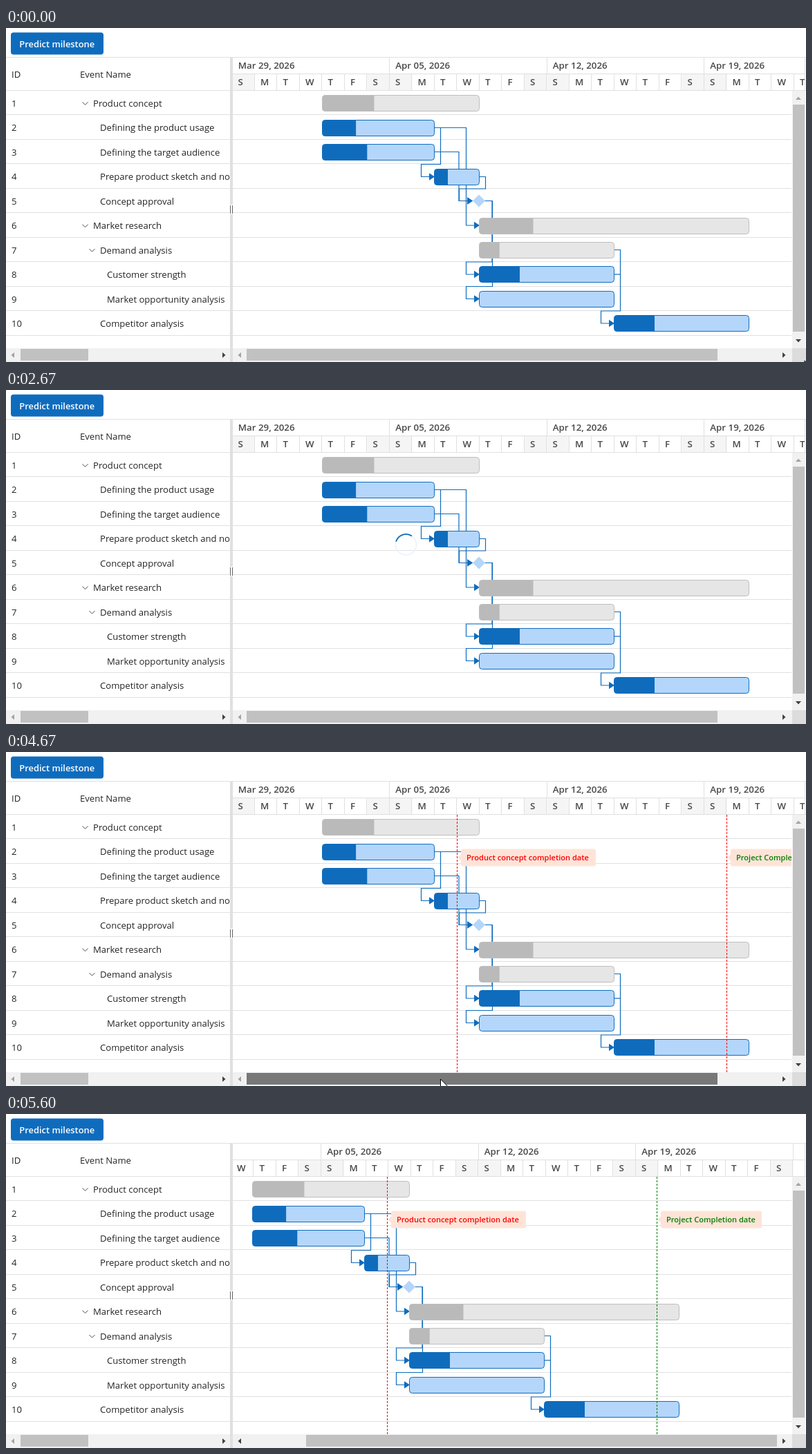
Recreate the animation shown at these times as an HTML page. Size 1157x484 px, loop 6.87 s.

```html
<!DOCTYPE html>
<html lang="en">
<head>
<meta charset="utf-8">
<title>Predict milestone</title>
<style>
  html, body { margin: 0; width: 100%; height: 100%; overflow: hidden; background: #fff; }
  svg { display: block; width: 1157px; height: 484px; }
  text { font-family: "Open Sans", "Noto Sans", sans-serif; font-size: 13.1px; fill: #242424; }
  .head text { font-weight: 600; font-size: 13.3px; fill: #484848; }
  .button { font-weight: 600; font-size: 12.9px; fill: #fff; }
  .label { font-weight: 600; font-size: 11.05px; }
  .rule { stroke: #e0e0e0; fill: none; }
  .link { stroke: #0f6cbd; stroke-width: 1.2; fill: none; }
  .dash { stroke-dasharray: 3 2; fill: none; }
</style>
</head>
<body>
<svg id="stage" viewBox="0 0 1157 484" xmlns="http://www.w3.org/2000/svg">
  <defs>
    <clipPath id="clipHead"><rect x="327" y="43" width="828" height="48"/></clipPath>
    <clipPath id="clipBody"><rect x="327" y="91" width="809" height="373"/></clipPath>
    <clipPath id="clipTree"><rect x="0" y="43" width="324" height="421"/></clipPath>
  </defs>
  <rect width="1157" height="484" fill="#fff"/>
  <rect id="button" x="7" y="6.5" width="134" height="32" rx="4"/>
  <text class="button" x="19.3" y="27.7">Predict milestone</text>
  <g id="tree" clip-path="url(#clipTree)">
    <text x="8" y="72">ID</text>
    <text x="107" y="72">Event Name</text>
  </g>
  <g clip-path="url(#clipHead)"><g id="head" class="head"></g></g>
  <g clip-path="url(#clipBody)">
    <g id="rules"></g>
    <g id="chart"><g id="links"></g><g id="bars"></g><g id="markers"></g></g>
  </g>
  <path class="rule" d="M0 42.5H1157M0 90.5H324M328 90.5H1157M328 66.5H1155M1155.5 43V90"/>
  <rect x="324" y="43" width="4" height="441" fill="#e0e0e0"/>
  <rect x="323" y="256" width="6" height="14" fill="#fff"/>
  <path d="M324.5 257V269M327.5 257V269" stroke="#616161"/>
  <g id="scrollbars"></g>
  <g id="spinner" fill="none" stroke-width="1.8">
    <circle cx="578.5" cy="224" r="15" stroke="#ebf3fc"/>
    <path id="arc" stroke="#0f6cbd"/>
  </g>
  <path id="arrow" fill="#fff" stroke="#000" d="M0 0V17.6L4.1 13.7L7 20.4L9.8 19.2L7 12.7H12.5Z"/>
  <path id="resize" fill="#000" stroke="#fff" stroke-width=".8"
        d="M-2.5 -10H-.8V10H-2.5ZM.8 -10H2.5V10H.8ZM-12.5 0L-7 -5V-1H-3.5V1H-7V5ZM12.5 0L7 -5V-1H3.5V1H7V5Z"/>
</svg>
<script>
  const LOOP = 6870, DAY = 32.5, LEFT = 327.5, ROW = 35.47;
  const BLUE = "#0f6cbd", PALE = "#b4d6fa";
  const $ = id => document.getElementById(id);
  const dayX = n => LEFT + n * DAY;
  const crisp = v => Math.ceil(v) - .5;

  function add(parent, tag, attrs, content) {
    const el = document.createElementNS("http://www.w3.org/2000/svg", tag);
    for (const key in attrs) el.setAttribute(key, attrs[key]);
    if (content) el.textContent = content;
    parent.appendChild(el);
    return el;
  }

  // name, indent level, start day, length in days, progress, has children
  const tasks = [
    ["Product concept", 0, 4, 7, .33, 1],
    ["Defining the product usage", 1, 4, 5, .3],
    ["Defining the target audience", 1, 4, 5, .4],
    ["Prepare product sketch and notes", 1, 9, 2, .3],
    ["Concept approval", 1, 11, 0, 0],
    ["Market research", 0, 11, 12, .2, 1],
    ["Demand analysis", 1, 11, 6, .15, 1],
    ["Customer strength", 2, 11, 6, .3],
    ["Market opportunity analysis", 2, 11, 6, 0],
    ["Competitor analysis", 1, 17, 6, .3]
  ];

  function drawBar(x, y, width, progress, parent) {
    const done = width * progress, bars = $("bars");
    const frame = { x, y, width, height: 23, rx: 4 };
    add(bars, "rect", { ...frame, fill: parent ? "#e6e6e6" : PALE });
    if (done) add(bars, "path", {
      d: `M${x + done} ${y}H${x + 4}q-4 0-4 4v15q0 4 4 4H${x + done}Z`,
      fill: parent ? "#bababa" : BLUE
    });
    add(bars, "rect", { ...frame, fill: "none", stroke: parent ? "#bebebe" : BLUE });
  }

  tasks.forEach(([name, level, start, days, progress, parent], i) => {
    const mid = 109 + ROW * i, line = Math.round(90 + ROW * (i + 1)) + .5;
    const textX = 126 + 10 * level;
    add($("tree"), "text", { x: 8, y: mid + 4.8 }, String(i + 1));
    add($("tree"), "text", { x: textX, y: mid + 4.8 }, name);
    if (parent) add($("tree"), "path", { d: `M${textX - 15.5} ${mid - 1.7}l4 4l4-4`, fill: "none", stroke: "#4a4a4a" });
    add($("tree"), "path", { class: "rule", d: `M0 ${line}H324` });
    add($("rules"), "path", { class: "rule", d: `M328 ${line}H1136` });
    const x = crisp(dayX(start));
    if (days) drawBar(x, Math.round(97.2 + ROW * i) + .5, crisp(dayX(start + days)) - x, progress, parent);
    else add($("bars"), "path", { d: "M684 241.5l9 9l-9 9l-9-9Z", fill: PALE });
  });

  // Connector routes; each ends in an arrow head unless marked plain
  [
    ["M620 144.5H628.5V197.5H600.5V215.5", 620, 215.5],
    ["M620 144.5H665.5V286", 685, 286],
    ["M620 179.5H655V250.5", 675, 250.5],
    ["M685 215.5H693.5V233H655.5V250.5", 675, 250.5],
    ["M692 250.5H703V339H665.5V357", 685, 357],
    ["M692 250.5H703.5V374.5H665.5V392.5", 685, 392.5],
    ["M880 321.5H888.5V410H860.5V428", 880, 428],
    ["M880 357H888.5"]
  ].forEach(([d, x, y]) => {
    add($("links"), "path", { class: "link", d: x ? `${d}H${x - 7}` : d });
    if (x) add($("links"), "path", { d: `M${x} ${y}l-8-5.2v10.4Z`, fill: BLUE });
  });

  function addMarker(x, text, width, color) {
    const m = $("markers");
    const line = add(m, "path", { class: "dash", d: `M${x} 91V464`, stroke: color });
    add(m, "path", { d: `M${x + .5} 153l5.5-5v10Z`, fill: "#fee4d8" });
    add(m, "rect", { x: x + 5.5, y: 140.5, width, height: 25, rx: 3, fill: "#fee4d8" });
    add(m, "text", { class: "label", x: x + 13.5, y: 157.4, style: `fill:${color}` }, text);
    return line;
  }
  addMarker(dayX(10), "Product concept completion date", 195, "red");
  const endLine = addMarker(dayX(22), "Project Completion date", 146, "green");

  ["Mar 29, 2026", "Apr 05, 2026", "Apr 12, 2026", "Apr 19, 2026"].forEach((week, w) => {
    const head = $("head"), x = dayX(7 * w);
    add(head, "text", { x: x + 8.3, y: 59 }, week);
    add(head, "path", { class: "rule", d: `M${crisp(x + 7 * DAY)} 43V66` });
    [..."SMTWTFS"].forEach((letter, d) => {
      const dx = x + d * DAY;
      if (letter === "S") add(head, "rect", { x: dx, y: 67, width: DAY, height: 23, fill: "#f5f5f5" });
      add(head, "path", { class: "rule", d: `M${crisp(dx + DAY - .5)} 67V90` });
      add(head, "text", { x: dx + 8, y: 82.6 }, letter);
    });
  });

  // Scrollbars
  const bar = $("scrollbars"), OFF = "#a3a3a3", ON = "#404040";
  const box = (x, y, width, height, fill) => add(bar, "rect", { x, y, width, height, fill });
  const tip = (d, fill) => add(bar, "path", { d, fill });
  box(0, 464, 324, 20, "#f1f1f1");
  box(328, 464, 809, 20, "#f1f1f1");
  box(1137, 91, 19, 373, "#f1f1f1");
  box(1137, 464, 20, 20, "#dcdcdc");
  box(21, 465, 98, 17, "#c1c1c1");
  box(1138, 111, 17, 329, "#c1c1c1");
  const thumb = box(348, 465, 681, 17, "#c1c1c1");
  tip("M12 470v8l-4.5-4Z", OFF);
  tip("M313 470v8l4.5-4Z", ON);
  const backTip = tip("M340 470v8l-4.5-4Z", OFF);
  tip("M1123 470v8l4.5-4Z", ON);
  tip("M1142 104h8l-4-4.5Z", OFF);
  tip("M1142 451h8l-4 4.5Z", ON);

  const half = 54 * Math.PI / 180, ax = 15 * Math.sin(half), ay = 15 * Math.cos(half);
  $("arc").setAttribute("d", `M${578.5 - ax} ${224 - ay}A15 15 0 0 1 ${578.5 + ax} ${224 - ay}`);

  // Pointer positions held from each time on: time, x, y, shape
  const pointer = [
    [0, 1155, 482], [130, 740, 340], [200, 322, 203, "resize"], [470, 83, 49], [530],
    [800, 58, 4], [870, 48, 7], [930, 42, 9], [1000, 39.5, 10.5],
    [2130, 270, 210], [2200, 520, 430], [2270, 578, 472], [2330],
    [3670, 603, 480], [3730, 608.5, 478], [3800, 612, 476], [3870, 618, 475], [3930, 624, 474],
    [4070, 625, 474], [4130, 626, 474], [4200, 628, 474],
    [4670, 628.5, 474], [4730, 652, 473], [4800, 675, 472], [4870, 697, 471],
    [4930, 711, 471], [5000, 722, 471], [5070, 727, 471], [5200, 731, 471], [5330, 733, 471],
    [5530, 396, 457], [5600]
  ];
  const buttonColor = [[0, BLUE], [800, "#1067b4"], [870, "#1063ac"], [930, "#115ea3"],
    [1330, "#0f548c"], [1530, "#115ea3"], [2130, "#1063ac"], [2270, BLUE]];
  const thumbColor = [[0, "#c1c1c1"], [3670, "#a8a8a8"], [4470, "#787878"], [5530, "#c1c1c1"]];
  const at = (steps, t) => steps.filter(s => s[0] <= t).pop();
  const show = (el, on) => el.setAttribute("visibility", on ? "visible" : "hidden");
  const slide = (id, x) => $(id).setAttribute("transform", `translate(${-x} 0)`);
  // The header is wider than the chart, so it stops scrolling sooner
  const GRAB = 636, TRAVEL = 86, SCROLL = 101, HEAD_SCROLL = 99;

  function frame() {
    const t = performance.now() % LOOP;
    const [, x, y, shape] = at(pointer, t);
    for (const id of ["arrow", "resize"]) {
      show($(id), x !== undefined && id === (shape || "arrow"));
      $(id).setAttribute("transform", `translate(${x || 0} ${y || 0})`);
    }

    const drag = t < 4670 ? 0 : t >= 5000 ? TRAVEL : Math.max(0, x - GRAB);
    const scroll = Math.floor(drag * SCROLL / TRAVEL);
    slide("chart", scroll);
    slide("head", Math.min(scroll, HEAD_SCROLL));
    thumb.setAttribute("x", 348 + drag);
    thumb.setAttribute("fill", at(thumbColor, t)[1]);
    backTip.setAttribute("fill", drag ? ON : OFF);
    endLine.setAttribute("stroke", drag ? "green" : "red");
    $("button").setAttribute("fill", at(buttonColor, t)[1]);

    show($("spinner"), t >= 1530 && t < 3200);
    show($("markers"), t >= 3200);
    const turn = Math.floor((t - 1530) / 66.7 + .01) * 66.7 / 1200 * 360;
    $("arc").setAttribute("transform", `rotate(${turn} 578.5 224)`);
    requestAnimationFrame(frame);
  }
  frame();
</script>
</body>
</html>
```
